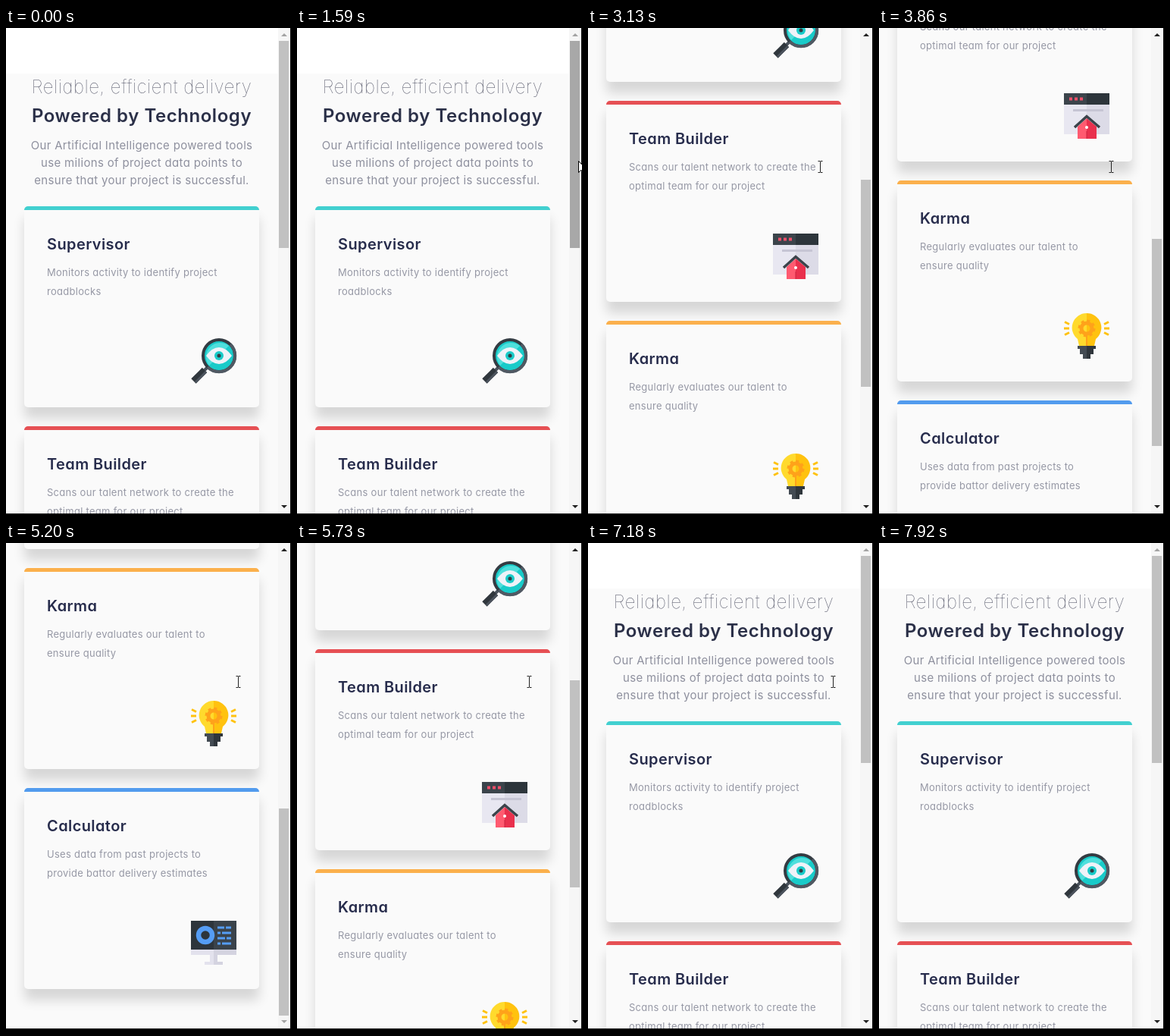
An HTML page for the animation above (7990 ms loop, 376 by 642 pixels).

```html
<!DOCTYPE html>
<html lang="en">
<head>
<meta charset="utf-8">
<title>Feature cards</title>
<style>
html, body { margin: 0; width: 100%; height: 100%; overflow: hidden; background: #fff; }
#stage { position: relative; width: 376px; height: 642px; overflow: hidden; font-family: Inter, sans-serif; font-feature-settings: "cv11"; }
#page { position: absolute; left: 0; top: 0; width: 359px; height: 1422px; }
#page::before { content: ""; position: absolute; top: 60px; width: 100%; height: 1362px; background: #fafafa; }
svg { position: absolute; left: 0; top: 0; overflow: visible; }
.card { position: absolute; left: 24px; width: 310px; height: 260px; background: #fafafa; border-top: 5px solid; border-radius: 5px; box-shadow: 0 15px 15px rgba(0, 0, 0, .14); }
.card svg { top: -5px; }
.intro { text-anchor: middle; font-size: 15px; letter-spacing: .32px; fill: #8e909e; }
.intro .light { font-size: 24px; font-weight: 100; letter-spacing: .55px; fill: #4c4e61; }
.intro .bold { font-size: 24px; font-weight: 600; letter-spacing: .55px; fill: #2b3048; }
.title { font-size: 20px; font-weight: 600; letter-spacing: .4px; fill: #272c4c; }
.note { font-size: 13px; letter-spacing: .28px; fill: #9698a5; }
</style>
</head>
<body>
<div id="stage">
  <div id="page">
    <svg class="intro" width="359" height="230">
      <text class="light" x="179" y="86">Reliable, efficient delivery</text>
      <text class="bold" x="179" y="124">Powered by Technology</text>
      <text x="179" y="160">Our Artificial Intelligence powered tools</text>
      <text x="179" y="183">use milions of project data points to</text>
      <text x="179" y="206">ensure that your project is successful.</text>
    </svg>
  </div>
  <svg width="376" height="642">
    <path fill="#f6f6f6" d="M359 0h16v640h-16z"/>
    <rect id="thumb" x="360" y="17" width="13" height="273"/>
    <path id="up" d="M363 11l4-4 4 4z"/>
    <path id="down" d="M363 629h8l-4 4z"/>
    <path d="M375 0h1v642H0v-2h375z"/>
    <path id="arrow" fill="#fff" stroke="#000" d="M.5 .5v15l3.5-3.3 2.5 5.8 2.3-1-2.5-5.6h5z"/>
    <path id="beam" fill="none" stroke="#222" d="M-3 -7.5h2.5l.5 1 .5-1H3M0 -7V7M-3 7.5h2.5l.5-1 .5 1H3"/>
  </svg>
</div>
<script>
const LOOP = 7990;
const TICK = LOOP / 120; // the picture advances at about 15 steps a second
const MAX_SCROLL = 782;
const $ = id => document.getElementById(id);

const magnifier = `
  <path stroke="#4b535d" stroke-width="4" d="M23 36L15 44"/>
  <path stroke="#30373d" stroke-width="9" d="M18 41L3.500 55.500"/>
  <path stroke="#4b535d" stroke-width="3" d="M20 43L6 57"/>
  <circle cx="37" cy="22" r="21" fill="#19cbc9" stroke="#343b42" stroke-width="4"/>
  <path fill="none" stroke="#505963" stroke-width="4" d="M52 7A21 21 0 0 1 22 37"/>
  <path fill="#4fdfdc" d="M24 35A18.500 18.500 0 0 1 50 9z"/>
  <path fill="#eff2f8" d="M20 22Q28 11 37 11T54 22Q46 33 37 33T20 22z"/>
  <circle cx="37" cy="22" r="6" fill="#19cbc9"/>
  <circle cx="37" cy="22" r="2.500" fill="#343b42"/>`;

const house = `
  <path fill="#e8e7f1" d="M0 14h60v40H0z"/>
  <path fill="#dcdbe7" d="M30 14h30v40H30z"/>
  <path fill="#2d353b" d="M0 0h60v15H0z"/>
  <path fill="#3b444b" d="M0 0h30v15H0z"/>
  <path fill="#f0506a" d="M7 5.500h4v4H7zm7 0h4v4h-4zm7 0h4v4h-4z"/>
  <path fill="#c6c5d4" d="M12 21h40v3H12z"/>
  <path fill="#ff5a70" d="M18 44L30 33V60H18z"/>
  <path fill="#e9304d" d="M30 33L43 44V60H30z"/>
  <path fill="none" stroke="#3b444b" stroke-width="3.500" d="M14 45L30 30.500 47 45"/>
  <circle cx="30" cy="45" r="2" fill="#fff"/>
  <path stroke="#c9233f" d="M30 50v10"/>`;

const rays = [-1, 1].map(side =>
  `<path stroke="#ffc20f" stroke-width="3" transform="translate(30 0) scale(${side} 1)" d="M23 14.500l6-3M23 20h7M23 25.500l6 3"/>`).join('');
const bulb = `${rays}
  <path fill="#ffda2d" d="M30 0A19 19 0 0 0 18 34L20 43H30z"/>
  <path fill="#ffc20f" d="M30 0A19 19 0 0 1 42 34L40 43H30z"/>
  <circle cx="30" cy="20" r="7" fill="none" stroke="#ffa21a" stroke-width="5"/>
  <circle cx="30" cy="20" r="10" fill="none" stroke="#ffa21a" stroke-width="3" stroke-dasharray="4 3.850"/>
  <path stroke="#ffa21a" stroke-width="2" d="M30 28v15"/>
  <path fill="#434b53" d="M18 43h24v4H18zM21 47h18v7H21zM25 54h10v6H25z"/>
  <path fill="#2f363c" d="M30 43h12v4h-3v7h-4v6h-5z"/>`;

const monitor = `
  <path fill="#e3e2ed" d="M0 37h60v8H0zM25 45h10v9H25zM18 54h24v4H18z"/>
  <path fill="#d4d3e0" d="M30 37h30v8H30zM30 45h5v9h7v4H30z"/>
  <path fill="#2d353c" d="M0 0h60v38H0z"/>
  <path fill="#3a434b" d="M30 0h30v38H30z"/>
  <circle cx="19" cy="19" r="9" fill="none" stroke="#559df5" stroke-width="6.500"/>
  <path stroke="#559df5" stroke-width="3" d="M35 9h9M46 9h7M35 16h4M41 16h12M35 23h10M47 23h6M35 30h4M41 30h12"/>`;

const cards = [
  ['Supervisor', 'Monitors activity to identify project', 'roadblocks', '#42d0d0', magnifier],
  ['Team Builder', 'Scans our talent network to create the', 'optimal team for our project', '#e65054', house],
  ['Karma', 'Regularly evaluates our talent to', 'ensure quality', '#fbb04c', bulb],
  ['Calculator', 'Uses data from past projects to', 'provide battor delivery estimates', '#529bee', monitor],
];
$('page').insertAdjacentHTML('beforeend', cards.map(([title, line1, line2, color, icon], i) => `
  <div class="card" style="top:${235 + 290 * i}px;border-color:${color}">
    <svg width="310" height="265">
      <text class="title" x="30" y="57">${title}</text>
      <text class="note" x="30" y="92">${line1}</text>
      <text class="note" x="30" y="117">${line2}</text>
      <g transform="translate(220 175)">${icon}</g>
    </svg>
  </div>`).join(''));

// [time, value] pairs, joined by straight lines
const scrollKeys = [[2160, 0], [2590, 200], [2680, 200], [3270, 500], [3560, 500], [3862, 614], [4190, 782],
  [5200, 782], [5730, 382], [5860, 382], [6260, 182], [6460, 182], [6720, 0]];
const cursorKeys = [[1520, 378], [1598, 371], [1790, 322], [1940, 322], [2080, 306], [7130, 306], [7400, 380]];

function valueAt(keys, t) {
  const next = keys.findIndex(key => key[0] > t);
  if (next === 0) return keys[0][1];
  if (next < 0) return keys[keys.length - 1][1];
  const [t0, v0] = keys[next - 1], [t1, v1] = keys[next];
  return v0 + (v1 - v0) * (t - t0) / (t1 - t0);
}

function draw() {
  const t = Math.floor((performance.now() % LOOP + 10) / TICK) * TICK;
  const scroll = Math.round(valueAt(scrollKeys, t));
  const x = Math.round(valueAt(cursorKeys, t));
  const onBar = x >= 359;
  $('page').style.transform = `translateY(${-scroll}px)`;
  $('thumb').setAttribute('y', 17 + Math.round(scroll * 333 / MAX_SCROLL));
  $('thumb').setAttribute('fill', onBar && x < 376 ? '#a8a8a8' : '#c1c1c1');
  $('up').setAttribute('fill', scroll > 0 ? '#222' : '#a3a3a3');
  $('down').setAttribute('fill', scroll < MAX_SCROLL ? '#222' : '#a3a3a3');
  $('arrow').setAttribute('transform', `translate(${x} 175)`);
  $('beam').setAttribute('transform', `translate(${x + .5} 183)`);
  $('arrow').style.display = onBar ? '' : 'none';
  $('beam').style.display = onBar ? 'none' : '';
  requestAnimationFrame(draw);
}
draw();
</script>
</body>
</html>
```
